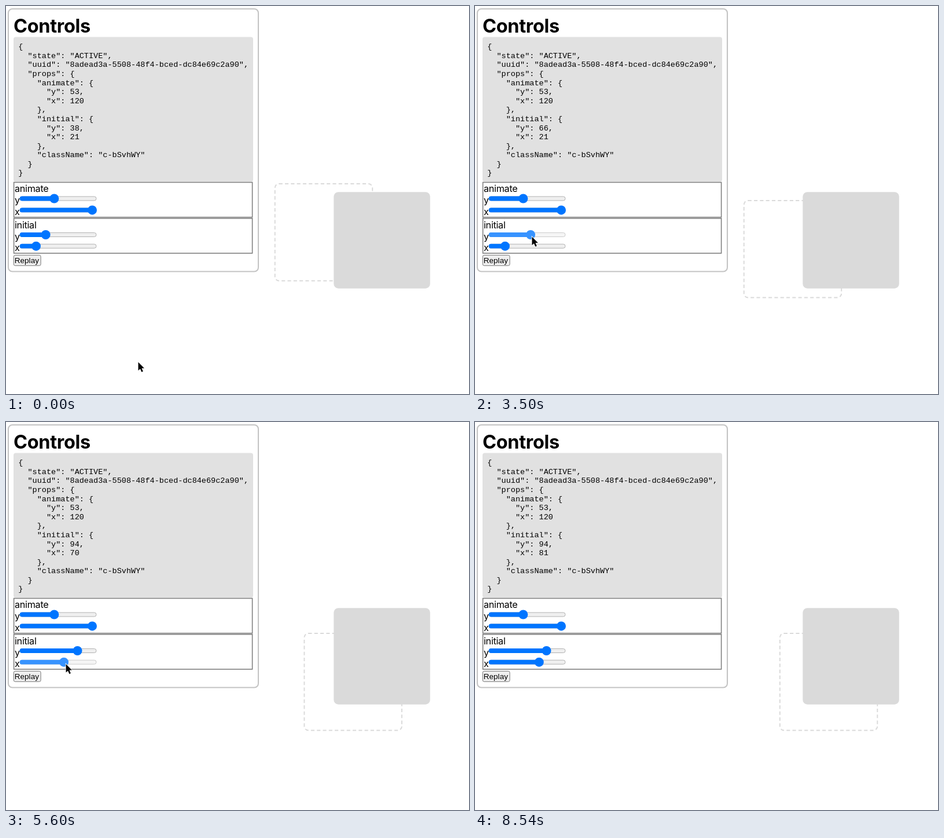
Animation, 800 px wide and 670 px high, one loop 8.82 s. Source, as an HTML page:

```html
<!DOCTYPE html>
<html lang="en">
<head>
<meta charset="utf-8">
<title>Controls</title>
<style>
  html, body { margin: 0; width: 100%; height: 100%; overflow: hidden; background: #fff; }
  svg { display: block; }
  text { font: 16.25px Inter, sans-serif; letter-spacing: -.02em; }
  #title { font-size: 32.5px; font-weight: 700; letter-spacing: -.01em; }
  #code text { font: 13.54px "Liberation Mono", monospace; letter-spacing: 0; white-space: pre; }
  #replay text { font: 13.54px "Liberation Sans", sans-serif; letter-spacing: 0; }
</style>
</head>
<body>
<svg width="800" height="670" viewBox="0 0 800 670">
  <rect x="4" y="5" width="432" height="453.5" rx="7" fill="#fff" stroke="#c4c4c4" stroke-width="2.1"/>
  <text id="title" x="13" y="46">Controls</text>
  <rect x="13" y="53.5" width="414" height="250" rx="4" fill="#e1e1e1"/>
  <g id="code"></g>
  <g fill="#fff" stroke="#808080" stroke-width="1.6">
    <rect x="13.6" y="304.5" width="412" height="60.2"/>
    <rect x="13.6" y="366.7" width="412" height="60.2"/>
  </g>
  <text x="15" y="321">animate</text>
  <text x="15" y="383.5">initial</text>
  <g id="sliders"></g>
  <g id="replay">
    <rect x="13.3" y="430.3" width="46.8" height="18" rx="2.5" fill="#efefef" stroke="#767676"/>
    <text x="14.8" y="444">Replay</text>
  </g>
  <rect id="ghost" width="168.5" height="167.5" rx="7" fill="none" stroke="#dadada" stroke-width="2" stroke-dasharray="6.1 4.2"/>
  <rect id="box" width="166.5" height="166.5" rx="8" fill="#dadada"/>
  <path id="cursor" d="M0 0V14.5L3.4 11.5L5.8 17L8.3 16L6 10.6H10.4Z" stroke="#fff" stroke-width="1.6" paint-order="stroke"/>
</svg>
<script>
const LOOP = 8820, STEP = 70, PRESS = 7267;
const $ = id => document.getElementById(id);
const within = (t, a, b) => t >= a && t < b;

function set(el, attrs) {
  for (const k in attrs) el.setAttribute(k, attrs[k]);
}
function add(parent, tag, attrs, text = "") {
  const el = document.createElementNS("http://www.w3.org/2000/svg", tag);
  set(el, attrs);
  el.textContent = text;
  return parent.appendChild(el);
}

// Eased pointer moves, each starting where the last one ended
const reach = { from: 840, to: 1545, x: 70, y: 398 };
const dragY = { from: 3070, to: 3920, x: 125, y: 399 };
const shift = { from: 4060, to: 4760, x: 54.9, y: 418 };
const dragX = { from: 4830, to: 5890, x: 113.9, y: 418 };
const toButton = { from: 6300, to: 6860, x: 51, y: 441 };
const leave = { from: 8260, to: 8540, x: 95, y: 690 };

const smooth = k => k * k * (3 - 2 * k);
function pointer(t) {
  let x = 228, y = 615;
  for (const m of [reach, dragY, shift, dragX, toButton, leave]) {
    const k = smooth(Math.min(1, Math.max(0, (t - m.from) / (m.to - m.from))));
    x += (m.x - x) * k;
    y += (m.y - y) * k;
  }
  return [x, y];
}

const RATIO = .98; // slider pixels per unit
function dragged(t, move, startX, from) {
  const [x] = pointer(Math.min(move.to, Math.max(move.from, t)));
  return Math.floor(from + (x - startX) / RATIO);
}

const looks = {
  idle: { fill: "#0075ff", track: "#efefef", edge: "#b2b2b2" },
  hover: { fill: "#005cc8", track: "#e2e2e2", edge: "#a0a0a0" },
  active: { fill: "#3793ff", track: "#f5f5f5", edge: "#cbcbcb" }
};

function slider(name, y) {
  const g = $("sliders");
  add(g, "text", { x: 15, y: y + 8.5 }, name);
  const track = add(g, "rect", { x: 24.2, y: y - 3.5, width: 131.8, height: 7, rx: 3.5 });
  const fill = add(g, "rect", { x: 23.7, y: y - 3.9, height: 7.8, rx: 3.9 });
  const thumb = add(g, "circle", { cy: y, r: 8 });
  return (value, state = "idle", px = -99) => {
    const look = looks[state], x = 31.4 + RATIO * value;
    const onThumb = state == "active" || Math.abs(px - x) < 8;
    set(track, { fill: look.track, stroke: look.edge });
    set(fill, { width: x - 23.7, fill: look.fill });
    set(thumb, { cx: x, fill: onThumb ? look.fill : looks.idle.fill });
  };
}
slider("y", 332.5)(53);
slider("x", 352.4)(120);
const sliderY = slider("y", 395), sliderX = slider("x", 414.7);

const lines = Array.from({ length: 15 }, (_, i) =>
  add($("code"), "text", { x: 21.2, y: 74.3 + i * 15.58 }));

function showCode(x, y) {
  const data = {
    state: "ACTIVE",
    uuid: "8adead3a-5508-48f4-bced-dc84e69c2a90",
    props: { animate: { y: 53, x: 120 }, initial: { y, x }, className: "c-bSvhWY" }
  };
  JSON.stringify(data, null, 2).split("\n").forEach((s, i) => lines[i].textContent = s);
}

// Underdamped spring, stiffness 500, damping 25
function spring(s) {
  const decay = 12.5, w = Math.sqrt(500 - decay * decay);
  return 1 - Math.exp(-decay * s) * (Math.cos(w * s) + decay / w * Math.sin(w * s));
}

function draw(t) {
  const [px, py] = pointer(t);
  const y = dragged(t, dragY, reach.x, 38);
  const x = dragged(t, dragX, shift.x, 21);

  const stateY = within(t, 2380, dragY.to) ? "active" : within(t, reach.to, 4410) ? "hover" : "idle";
  const stateX = within(t, dragX.from, 6160) ? "active"
    : within(t, 1400, reach.to) || within(t, 4410, 6440) ? "hover" : "idle";
  sliderY(y, stateY, px);
  sliderX(x, stateX, px);
  showCode(x, y);

  const over = within(t, toButton.to - STEP, leave.from + STEP);
  set($("replay").firstElementChild, { fill: over ? "#e2e2e2" : "#efefef", stroke: over ? "#4f4f4f" : "#767676" });

  set($("ghost"), { x: 464.7 + (x - 21) * 1.035, y: 307 + (y - 38) * 1.035 });
  const k = within(t, PRESS, 7700) ? 1 - spring((t - PRESS) / 1000) : 0;
  set($("box"), { x: 566.3 - 39.6 * k, y: 321.2 + 41.6 * k });
  set($("cursor"), { transform: `translate(${px + .5} ${py})` });
}

const start = performance.now();
function tick() {
  const t = (performance.now() - start) % LOOP;
  draw(Math.floor(t / STEP) * STEP);
  requestAnimationFrame(tick);
}
tick();
</script>
</body>
</html>
```
